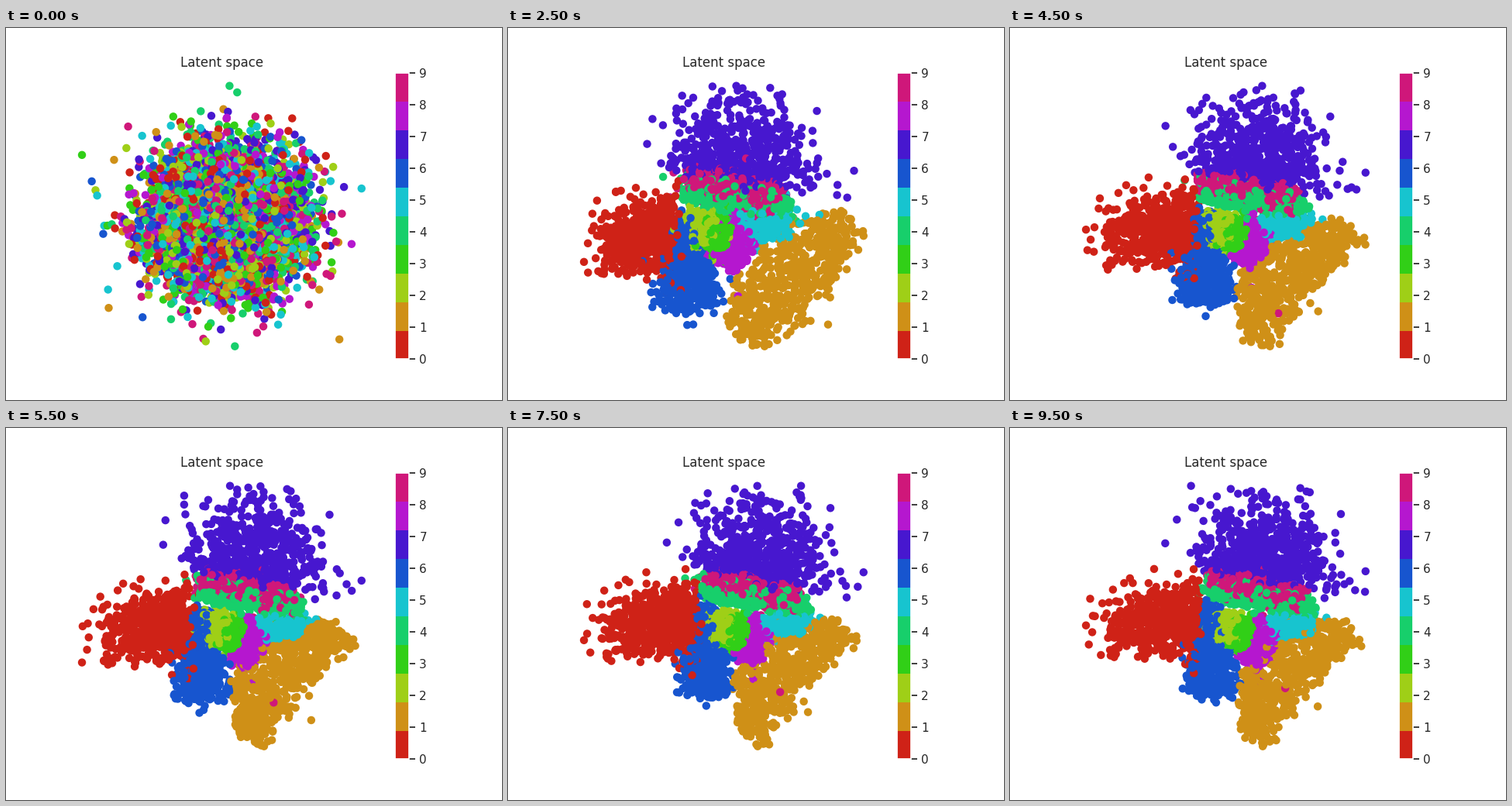
Recreate the animation shown at these times as a matplotlib script. Size 640 px wide and 480 px high, loop 10000 ms.

```python
import colorsys

import matplotlib.pyplot as plt
import numpy as np
from matplotlib.animation import FuncAnimation
from matplotlib.colors import ListedColormap

FRAMES, INTERVAL = 20, 500
COUNT = 6000
FORMED = 3  # frame in which the clusters have separated
INK = "0.15"
LEFT, RIGHT, TOP, BOTTOM = 98, 459, 74, 411

plt.rcParams["font.family"] = "DejaVu Sans"

# Settled clusters in pixels: spine start, spine end, spread at both ends.
CLUSTERS = [
    ((245, 246), (110, 254), (23, 22)),
    ((310, 393), (430, 262), (16, 13)),
    ((275, 240), (279, 276), (8, 9)),
    ((300, 248), (293, 282), (8, 8)),
    ((256, 204), (384, 236), (9, 8)),
    ((383, 248), (328, 262), (7, 7)),
    ((259, 230), (260, 342), (5, 20)),
    ((320, 200), (345, 80), (42, 40)),
    ((333, 255), (306, 300), (10, 9)),
    ((258, 194), (372, 222), (8, 9)),
]
starts, ends, spreads = (np.array(part, float) for part in zip(*CLUSTERS))

rng = np.random.default_rng(4)
digit = rng.integers(0, 10, COUNT)
blob = rng.normal(size=(COUNT, 2)) * (46, 42) + (283, 222)

is_arm = digit == 1
is_fan = np.isin(digit, (0, 7))
sags = np.isin(digit, (0, 6))
along = np.where(is_fan, np.abs(rng.normal(0, 0.42, COUNT)),
                 rng.uniform(0, 1, COUNT))
across = np.where(is_fan, rng.normal(size=COUNT),
                  rng.uniform(-1.45, 1.45, COUNT) + rng.normal(0, 0.35, COUNT))
scatter = rng.standard_t(3, size=(COUNT, 2))


def looseness(n):
    """1 while the clusters form, falling to 0 in the last frame."""
    def decay(m):
        return 1 / (1 + (m - FORMED) / 2)
    last = decay(FRAMES - 1)
    return (decay(max(n, FORMED)) - last) / (1 - last)


def clusters(n):
    loose = looseness(n)
    arm_loose = loose ** 1.5
    noise = np.random.default_rng(100 + n)
    a = along + noise.normal(0, 0.03, COUNT)
    b = across + noise.normal(0, 0.12, COUNT)
    a = np.where(is_arm, 0.5 + (a - 0.5) * (1 + 0.3 * arm_loose), a)

    axis = (ends - starts)[digit]
    normal = np.column_stack([-axis[:, 1], axis[:, 0]])
    normal /= np.hypot(*axis.T)[:, None]
    near, far = spreads[digit].T
    width = near + (far - near) * np.clip(a, 0, 1)
    width += is_arm * 9 * np.sin(np.pi * np.clip(a, 0, 1))
    width *= np.where(is_fan, 1 + 0.1 * loose, 1 + 0.5 * loose)
    bend = is_arm * (75 * arm_loose - 27) * 4 * a * (1 - a)
    points = starts[digit] + axis * a[:, None] + normal * (width * b + bend)[:, None]
    points += scatter * (1.8 + 3 * loose)

    # Early on the arm lies higher and all other clusters are pushed left.
    push = 65 * loose * np.clip((points[:, 0] - LEFT) / 110, 0, 1)
    points[:, 0] -= np.where(is_arm, 20 * arm_loose, push)
    points[:, 1] += np.where(is_arm, -18 * arm_loose,
                             sags * loose * (12 + 60 * (1 - loose)))
    x, y = points.T
    points[(x < LEFT) | (x > RIGHT) | (y < TOP) | (y > BOTTOM)] = np.nan
    return points


def cloud(n):
    if n == 0:
        return blob
    formed = 1 - max(0, 1 - n / FORMED) ** 3
    return blob + (clusters(n) - blob) * formed


palette = ListedColormap([colorsys.hls_to_rgb(0.01 + i / 10, 0.45, 0.8)
                          for i in range(10)])
fig, ax = plt.subplots(figsize=(6.4, 4.8), dpi=100)
nudge = 0.28 / 480
fig.subplots_adjust(bottom=0.11 - nudge, top=0.88 - nudge)
dots = ax.scatter(*blob.T, c=digit, cmap=palette, vmin=0, vmax=9,
                  s=36, linewidths=1.5)

bar = fig.colorbar(dots, ax=ax, ticks=range(10))
bar.outline.set(edgecolor="white", linewidth=1.25)
bar.ax.tick_params(length=6, width=1.25, color=INK, labelcolor=INK, labelsize=11)
ax.set_title("Latent space", fontsize=12, color=INK)
ax.axis("off")


def draw(n):
    points = cloud(n)
    dots.set_offsets(points)
    low, high = np.nanmin(points, axis=0), np.nanmax(points, axis=0)
    margin = 0.05 * (high - low)
    (x0, y0), (x1, y1) = low - margin, high + margin
    ax.set(xlim=(x0, x1), ylim=(y1, y0))
    return (dots,)


animation = FuncAnimation(fig, draw, frames=FRAMES, interval=INTERVAL,
                          init_func=lambda: draw(0), repeat=True, repeat_delay=0)
plt.show()
```
